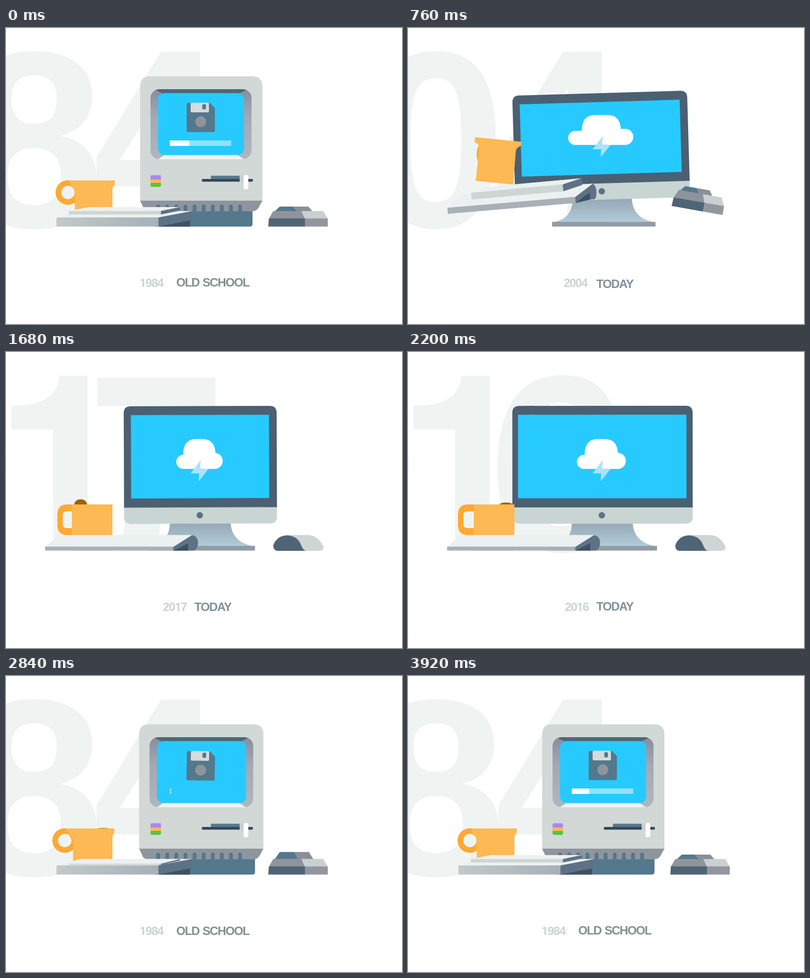
An HTML page for the animation above (3.96 s loop, 800 px wide and 600 px high).

```html
<!DOCTYPE html>
<html lang="en">
<head>
<meta charset="utf-8">
<title>Old school / Today</title>
<style>
html, body { margin: 0; width: 100%; height: 100%; overflow: hidden; background: #fff; }
svg { display: block; width: 800px; height: 600px; }
text { font-family: "Liberation Sans", Arial, sans-serif; font-weight: 700; }
.small { font-size: 24px; letter-spacing: -1.4px; word-spacing: 1.2px; }
.small .one { font-family: Roboto, sans-serif; font-size: 23px; }
.big { font-size: 510px; fill: #eff4f3; }
</style>
</head>
<body>
<svg viewBox="0 0 800 600">
  <defs>
    <linearGradient id="side" x2="0" y2="1"><stop stop-color="#848e9e"/><stop offset=".4" stop-color="#a3a8b3"/><stop offset="1" stop-color="#b0b6bd"/></linearGradient>
    <linearGradient id="stand" x2="0" y2="1"><stop stop-color="#93a3b0"/><stop offset="1" stop-color="#b1ccd9"/></linearGradient>
    <linearGradient id="front"><stop stop-color="#c2c9c8"/><stop offset="1" stop-color="#a7b0b7"/></linearGradient>
  </defs>
  <g id="scene"></g>
</svg>
<script>
const LOOP = 3960, STEP = 40;
const TO_NEW = 600, TO_OLD = 2280;   // the computer swaps
const LAND = 1120;                   // desk items land in the new style
const BEAT = 280;                    // period of the quick wobble, ms
const C = {
  blue: '#27caff', pale: '#92e1ff', shell: '#d2d8d6', steel: '#54788c', grey: '#8f949c',
  slate: '#5d7285', deep: '#4f6475', dark: '#3f5163', light: '#ebf0f1',
  cup: '#fdb953', handle: '#ffa933', coffee: '#a06300', ghost: '#eff4f3'
};

// Motion rules
const clamp = x => Math.min(1, Math.max(0, x));
const smooth = x => x * x * (3 - 2 * x);
const ramp = (t, from, to) => smooth(clamp((t - from) / (to - from)));
const wave = (t, period) => Math.cos(2 * Math.PI * t / period);
const spring = (t, amp, period, fade) => amp * Math.exp(-t / fade) * wave(t, period);
const since = (t, from) => (t - from + LOOP) % LOOP;
const isNew = t => t >= TO_NEW && t < TO_OLD;
const hop = t => 1.94 * Math.sin(Math.PI * clamp((t - 560) / 580));   // toss of the desk items
const charge = t => isNew(t) ? ((t - TO_NEW) / 1600) ** 28 : 0;       // sudden widening before the swap back
const rise = t => ramp(since(t, TO_OLD), 1100, 1300);                 // keys come up

// Markup helpers
const path = (fill, d) => `<path fill="${fill}" fill-rule="evenodd" d="${d}"/>`;
const poly = (fill, ...p) => `<polygon fill="${fill}" points="${p.join(' ')}"/>`;
const box = (fill, l, t, r, b, rx = 0) =>
  `<rect fill="${fill}" x="${l}" y="${t}" width="${Math.max(0, r - l)}" height="${Math.max(0, b - t)}" rx="${rx}"/>`;
const oval = (fill, x, y, rx, ry = rx) => `<ellipse fill="${fill}" cx="${x}" cy="${y}" rx="${rx}" ry="${ry}"/>`;
const group = (transform, ...kids) => `<g transform="${transform}">${kids.join('')}</g>`;
const about = (x, y, dy, rot, sx = 1, sy = 1) =>
  `translate(${x} ${y + dy}) rotate(${rot}) scale(${sx} ${sy}) translate(${-x} ${-y})`;

const yearAt = t => Math.floor(1984 + 33 * (ramp(t, 480, 960) - ramp(t, 2160, 2800)) + 1e-6);

const drawn = {
  1: 'M97 48H154V402H84V157H0V109C60 109 93 92 97 48Z',
  4: 'M217 48H138L8 262V321H147V402H217V321H260V267H217ZM147 123V267H55Z'
};
const bigDigit = (d, x) => drawn[d]
  ? group(`translate(${x})`, path(C.ghost, drawn[d]))
  : `<text class="big" x="${x}" y="403">${d}</text>`;

function backdrop(year) {
  const [, hundreds, tens, units] = String(year);
  if (tens !== '1') return bigDigit(tens, -85) + bigDigit(units, 175);
  return bigDigit(hundreds, -262) + bigDigit(tens, 11) + bigDigit(units, 162);
}

function caption(t, year) {
  const today = t >= 700 && t < 2420;
  const dy = spring(since(t, today ? 700 : 2420), 6, 340, 300);
  const x = 270 + 47 * (ramp(t, 640, 780) - ramp(t, 2340, 2480));
  const digits = String(year).replace(/1/g, '<tspan class="one">1</tspan>');
  return `<text class="small" x="${x}" y="524.5" fill="#c8d5d2">${digits}</text>` +
    `<text class="small" x="${today ? 380.5 : 344}" y="${524.5 + dy}" fill="${today ? '#82909a' : '#81908f'}">` +
    `${today ? 'TODAY' : 'OLD SCHOOL'}</text>`;
}

function floppy(dy, rot) {
  return group(about(393.5, 181, dy, rot),
    path(C.steel, 'M367 152H412L422 162V209Q422 211 420 211H367Q365 211 365 209V154Q365 152 367 152Z'),
    box('#d6dbdb', 373, 151.5, 410, 171, 2.5),
    box(C.steel, 396.5, 154.5, 404, 165, 2.5),
    oval(C.grey, 393.5, 190, 11));
}

function oldComputer(t) {
  const o = since(t, TO_OLD);
  const s = ramp(o, 1800, 2120) - .2 * ramp(o, 2160, 2280) - .16 * Math.exp(-o / 60);   // vertical stretch
  const w = spring(o, 85, BEAT, 150);                                                  // extra width
  const l = 271 - w, r = 518 + w, top = 98 - 71 * s, chin = 350 - 9 * s;
  const bl = 292 - w, br = 496 + w * 1.7, bt = 124 - 77 * s, bb = 266 - 13 * s;
  const sl = 307 - w, sr = 481 + w * 2, st = 132 - 76 * s, sb = 257.5 - 13.5 * s;
  const up = -47 * s, bar = 228 + up;
  const track = 124 * ramp(o, 520, 960), loaded = 39.5 + .11 * (o - 1680);
  let vents = '';
  for (let x = 303.5; x < 475; x += 18.4)
    vents += path(C.steel, `M${x} 371.5V${362 - 5 * s}a3.8 4 0 0 1 7.6 0V371.5Z`);
  return [
    path(C.steel, `M300 365H${498 + w * 2.5}V397q0 5.5 -5.5 5.5H300Z`),
    path(C.shell, `M${l} ${chin + .5}V${top + 20}q0 -20 20 -20H${r - 20}q20 0 20 20V${chin + .5}Z`),
    path('#8e959c', `M${l} ${chin}H${r}L${r - 7} 363Q${r - 11} 371.5 ${r - 21} 371.5H${l + 18}Q${l + 8} 371.5 ${l + 6} 363Z`),
    vents,
    box('url(#side)', bl, bt, br, bb, 18),
    path('#4b6979', `M${bl + 11} ${bt + 2}Q${bl + 14} ${bt} ${bl + 18} ${bt}H${br - 18}Q${br - 14} ${bt} ${br - 11} ${bt + 2}L${br - 25} ${st + 1}H${bl + 25}Z`),
    poly('#f1f3f4', bl + 28, sb, br - 28, sb, br - 15, bb, bl + 15, bb),
    box(C.blue, sl, st, sr, sb, 13),
    floppy(up + spring(o, 22, BEAT, 170), spring(o, 9, BEAT, BEAT)),
    box(C.pale, 331, bar, 331 + track, bar + 11),
    box('#fff', 331, bar, 331 + loaded, bar + 11),
    group(`translate(0 ${-9 * s})`,
      path('#ac86ee', 'M292 307V301.5q0 -3 3 -3H310q3 0 3 3V307Z'),
      box('#fcb84e', 292, 307, 313, 314),
      path('#52c63e', 'M292 314H313V319q0 3 -3 3H295q-3 0 -3 -3Z'),
      box(C.steel, 414, 299.5, 474, 308),
      box('#33475b', 395.5, 306, 499, 311.5, 2.7),
      box('#c9cfcf', 472, 299, 481, 312),
      box('#fff', 480, 298, 489.5, 327, 3.5))
  ].join('');
}

function cloud(e) {
  const l = 345 - e, r = 437 + e * .85, k = e * .33;
  return path('#fff', `M${l + 14} 237a14 14 0 0 1 0 -28.5H400V204.5H${r - 16}a16 16.2 0 0 1 0 32.5Z`) +
    path('#fff', `M${358 - k} 225V209Q${358 - k} 176.5 ${384 - k} 176.5H${397 + k}Q${423 + k} 176.5 ${423 + k} 209V225Z`) +
    poly('#aae3fa', 393.5, 219, 373, 246, 390, 246, 389.5, 262, 409, 237, 392, 236);
}

function newComputer(t) {
  const n = t - TO_NEW, c = charge(t);
  const wobble = spring(n, -36, 293, 400);
  const hw = 153.5 + wobble + 28 * c;
  const top = 109 + spring(n, -70, 440, 232);
  const tilt = spring(n, 4, 440, 365);
  const l = 393 - hw, r = 393 + hw, inset = 14.5 - 3 * c;
  return group(about(395, 402, 0, 0, 1 - .4 * Math.exp(-n / 60), 1),
      path('url(#stand)', 'M331 340H454V348C456 376 476 391 503 393.5H288C314 391 330 376 331 348Z'),
      box('#949ba3', 288, 393, 503, 402.5)) +
    group(about(392, 331, 0, tilt),
      path('#4b6072', `M${l} 316V${top + 14}q0 -14 14 -14H${r - 14}q14 0 14 14V316Z`),
      path('#c8d5d3', `M${l} 315H${r}V334q0 14 -14 14H${l + 14}q-14 0 -14 -14Z`),
      box(C.blue, l + inset, top + 18, r - inset - 1, 296.5),
      oval(C.slate, 391.5, 331, 6.5)) +
    cloud(.92 * wobble + 3 * c);
}

function tossedCup(lift) {
  const m = Math.min(1, lift), lip = 41 + 6 * m;
  return group(`translate(${179.5 + 2.5 * m} ${309 - 48.5 * lift}) rotate(${5.5 * m})`,
    path(C.handle, `M-36 12Q${-46 - 40 * (1 - m)} 30 -34 54Z`),
    path(C.cup, `M${-lip} 0H${lip}V9Q38 13 38 20L39 88H-37L-36 20Q-37 13 ${-lip} 10Z`));
}

function oldCup(x) {
  const cx = 126 + x * 7;
  return path(C.handle, `M${cx - 25} 333.5a25 25 0 1 0 50 0a25 25 0 1 0 -50 0ZM${cx - 13.5} 333.5a13.5 13.5 0 1 0 27 0a13.5 13.5 0 1 0 -27 0Z`) +
    path(C.cup, `M${cx + 3} 309H${220 + x}V318Q215 321 215 328V384H${139.5 + x * 4}V333.5A13.5 13.5 0 0 0 ${cx + 6} 321.5Z`);
}

function newCup(t) {
  const a = t - LAND, drop = spring(a, -8, 240, 100);
  const l = 104 + spring(a, 24, 240, 150) - 3 * charge(t);
  return group(`translate(0 ${drop})`,
    path(C.handle, `M150 309H${l + 20}q-20 0 -20 20V351q0 20 20 20H150ZM142 323H${l + 19}q-8 0 -8 8V349q0 8 8 8H142Z`),
    box(C.cup, 133, 309, 215, 402.5 - Math.max(0, drop)));
}

function cup(t) {
  const lift = hop(t);
  if (t < LAND && lift > .02) return tossedCup(lift);
  const height = Math.min(12, 11 * Math.exp((1680 - t) / 580));
  const coffee = t >= LAND && t < 3000 ? oval(C.coffee, 173 + 25 * wave(t - 2200, 330), 309.5, 13, height) : '';
  return coffee + (t >= LAND && t < TO_OLD ? newCup(t) : oldCup(spring(since(t, TO_OLD), 3, 1120, 533)));
}

function upperSlab(t) {
  const k = rise(t), lift = hop(t), m = Math.min(1, lift);
  const b = 371 - 8 * k, f = 380.5 - 9.5 * k, u = 383 - 5 * k + 5 * m;
  return group(about(220, 371, -26.5 * lift, -5.2 * m, 1, 1 + .15 * m),
    poly(C.light, 127, f, 168, b, 352, b, 313, f),
    poly('#cfd5d3', 127, f, 313, f, 313, u, 127, u),
    poly(C.slate, 313, f, 352, b, 352, b + 3 + 4 * k + 5 * m, 313, u));
}

function keyboard(t) {
  if (!isNew(t))
    return group(about(230, 402.5, 0, 0, 1, 1 + spring(since(t, TO_OLD), .3, BEAT, 150)),
      poly(C.light, 102, 384.5, 150, 371, 377, 371, 308, 384.5),
      box('url(#front)', 102, 384, 308, 402.5),
      poly(C.slate, 308, 384, 377, 371, 372, 391, 308, 402.5),
      poly(C.dark, 308, 402.5, 372, 390, 372, 402.5)) + upperSlab(t);
  const lift = hop(t), m = Math.min(1, lift), b = 402.5 + 4.5 * m, end = 388 - 6 * m;
  return group(about(208, 395, -24 * lift, -4.9 * m),
    path(C.slate, `M338 395L375 371Q${end} 373 ${end} 387Q${end - 1} 402.5 376 402.5H366L338 ${b}Z`),
    poly(C.dark, 338, b, 368, 388, 368, 402.5),
    poly(C.light, 79, 395, 106, 371, 376, 371, 338, 395),
    box('#a9b1b7', 79, 394.5, 338, b)) + (t < LAND ? upperSlab(t) : '');
}

function mouse(t) {
  if (t >= LAND && t < TO_OLD)
    return group(about(590, 403, 0, 0, 1, 1 + spring(t - LAND, .2, 240, 120)),
      path('#cfd5d5', 'M566 371H610Q624 371 634 383Q641 391 641.5 396Q641 403 632 403H560Z'),
      path(C.deep, 'M540 393Q541 385 551 376.5Q566 368 582 375Q592 380 596 391Q600 402 606 403H548Q540 402 540 393Z'));
  const o = since(t, TO_OLD), lift = hop(t), m = Math.min(1, lift);
  const top = 357 + 5 * rise(t) + spring(o, 14, BEAT, 120);
  const sy = 1 + .1 * m + spring(o, .25, BEAT, 150);
  const q = (362 - top) / 5;
  return group(`translate(${-6 * m}) ` + about(590, 402.5, -19 * lift, 10 * m, 1 - .13 * m, sy),
    poly(C.steel, 543, 371.5, 553, top, 580 + 3 * q, top, 588 + 2 * q, 371.5),
    poly('#8a8f96', 580 + 3 * q, top, 611 + q, top, 619 + 2 * q, 371.5, 588 + 2 * q, 371.5),
    poly(C.grey, 531, 386.5, 540, 371, 597, 371, 604, 386.5),
    poly('#c9d0d0', 597, 371, 641, 371, 650, 386.5, 604, 386.5),
    poly(C.deep, 530, 402.5, 531, 386, 604, 386, 604, 402.5),
    box('#94969f', 604, 386, 650, 402.5));
}

const scene = document.getElementById('scene');
const start = performance.now();
let shown = -1;

function frame() {
  const step = Math.floor((performance.now() - start + 2) / STEP) % (LOOP / STEP);
  if (step !== shown) {
    shown = step;
    const t = step * STEP, year = yearAt(t);
    const computer = isNew(t) ? newComputer : oldComputer;
    scene.innerHTML = backdrop(year) + computer(t) + cup(t) + keyboard(t) + mouse(t) + caption(t, year);
  }
  requestAnimationFrame(frame);
}
frame();
</script>
</body>
</html>
```
